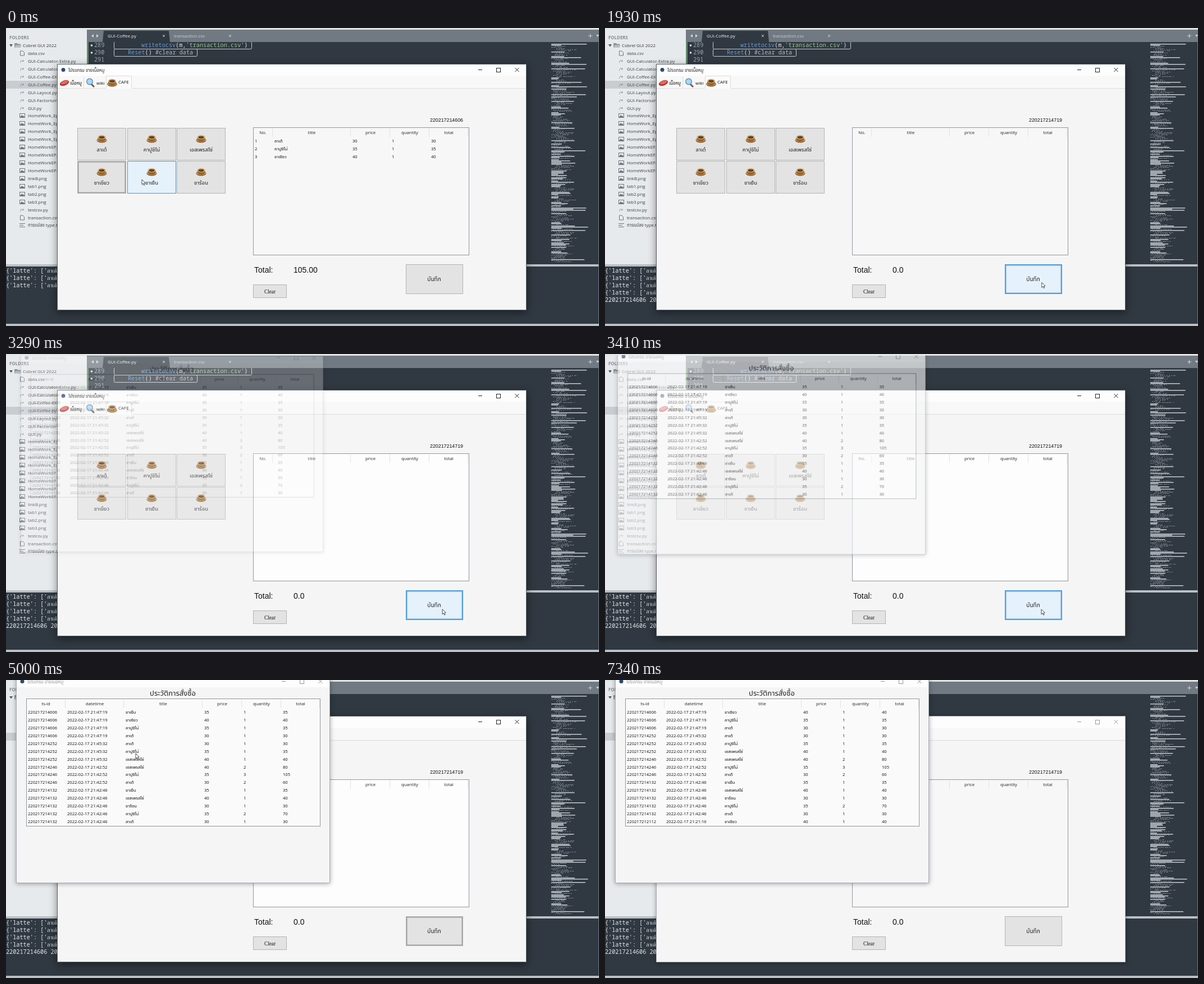
Recreate the animation shown at these times as an HTML page with a canvas. Size 1056 px wide and 531 px high, loop 7890 ms.

```html
<!DOCTYPE html>
<html lang="th">
<head>
<meta charset="utf-8">
<title>Cafe till</title>
<style>
html, body { margin: 0; width: 100%; height: 100%; overflow: hidden; background: #303841; }
canvas { display: block; width: 1056px; height: 531px; }
</style>
</head>
<body>
<canvas id="stage" width="1056" height="531"></canvas>
<script>
const LOOP = 7890;
const stage = document.getElementById('stage').getContext('2d');
const layer = new OffscreenCanvas(600, 400).getContext('2d');
let ctx = stage;
const UI = '"Open Sans", "Noto Sans", "Noto Sans Thai", sans-serif';
const THAI = '"Noto Sans Thai Looped", Loma, "Noto Sans Thai", "Noto Sans", sans-serif';
const MONO = '"Noto Sans Mono", "DejaVu Sans Mono", monospace';
const ARIAL = '"Liberation Sans", sans-serif';
const SERIF = '"Liberation Serif", serif';

const MENU = [['ลาเต้', 30], ['คาปูชิโน่', 35], ['เอสเพรสโซ่', 40],
              ['ชาเขียว', 40], ['ชาเย็น', 35], ['ชาร้อน', 30]];

// id, time, then menu index and quantity of each item
const SALES = [
  ['220217214606', '21:47:19', '41 31 11 01'],
  ['220217214252', '21:45:32', '01 11 21'],
  ['220217214246', '21:42:52', '22 13 02'],
  ['220217214132', '21:42:46', '41 21 51 12 01'],
  ['220217212112', '21:21:16', '31 41 11']
];
const HISTORY = SALES.flatMap(([id, time, items]) => items.split(' ').map(([m, q]) => {
  const [name, price] = MENU[m];
  return [id, '2022-02-17 ' + time, name, price, q, price * q];
}));

// column widths
const ORDER = { 'No.': 35, title: 139, price: 70, quantity: 70, total: 69 };
const LOG = { 'ts-id': 70, datetime: 104, title: 140, price: 70, quantity: 70, total: 69 };

const FILES = ['data.csv', 'GUI-Calculator-Extra.py', 'GUI-Calculator.py', 'GUI-Coffee-EX.py',
  'GUI-Coffee.py', 'GUI-Layout.py', 'GUI-Factorium.py', 'GUI.py',
  ...Array(4).fill('HomeWork_Ep.png'), ...Array(4).fill('HomeWorkEP.png'),
  'linkB.png', 'tab1.png', 'tab2.png', 'tab3.png', 'testcsv.py', 'transaction.csv', 'การแปลง type.txt'];

// pointer stops: time, x, y
const STOPS = [[0, 242, 270], [510, 257, 271], [910, 268, 275], [1180, 702, 461], [1480, 778, 453],
  [3530, 777, 455], [4040, 333, -5], [4330, 341, 35], [5000, 231, 131], [5820, 228, 135],
  [6250, 978, 437], [6560, 1012, 517], [6710, 1012, 560]];

const clamp = (v, lo, hi) => Math.min(hi, Math.max(lo, v));

function rect(x, y, w, h, fill) {
  ctx.fillStyle = fill;
  ctx.fillRect(x, y, w, h);
}
function frame(x, y, w, h, color, width = 1) {
  ctx.strokeStyle = color;
  ctx.lineWidth = width;
  ctx.strokeRect(x + width / 2, y + width / 2, w - width, h - width);
}
function text(s, x, y, size = 7.9, color = '#111', font = UI, align = 'left', weight = '') {
  ctx.font = `${weight} ${size}px ${font}`;
  ctx.fillStyle = color;
  ctx.textAlign = align;
  ctx.fillText(s, x, y);
}
function trace(p) {
  ctx.beginPath();
  for (let i = 0; i < p.length; i += 2) ctx.lineTo(p[i], p[i + 1]);
}
function line(color, width, ...p) {
  ctx.strokeStyle = color;
  ctx.lineWidth = width;
  trace(p);
  ctx.stroke();
}
function poly(fill, ...p) {
  ctx.fillStyle = fill;
  trace(p);
  ctx.fill();
}
function oval(x, y, rx, ry, fill, turn = 0) {
  ctx.fillStyle = fill;
  ctx.beginPath();
  ctx.ellipse(x, y, rx, ry, turn, 0, 7);
  ctx.fill();
}
function cross(x, y, r, color) {
  line(color, 1, x - r, y - r, x + r, y + r);
  line(color, 1, x - r, y + r, x + r, y - r);
}

function fileIcon(name, y) {
  const gray = '#6d757c';
  if (name.endsWith('.py')) text('/*', 25, y + 3, 8, gray);
  else if (name.endsWith('.csv')) {
    line(gray, 1, 25.5, y - 4, 30, y - 4, 32.5, y - 1.5, 32.5, y + 4, 25.5, y + 4, 25.5, y - 4);
  } else if (name.endsWith('.png')) {
    frame(24, y - 4, 10, 8, gray);
    poly(gray, 25, y + 3, 28, y - 1, 30, y + 1, 31, y, 33, y + 3);
  } else for (let i = -3; i < 5; i += 3) rect(24, y + i, i ? 10 : 7, 1, gray);
}

function sidebar() {
  rect(0, 2, 144, 419, '#e7eaec');
  text('FOLDERS', 6, 20, 7.9, '#858c92', UI, 'left', 'bold');
  poly('#555', 6, 29, 12, 29, 9, 33.5);
  poly('#8d959c', 15, 27, 20, 27, 21, 28.5, 26, 28.5, 26, 35, 15, 35);
  poly('#b9c0c5', 17, 30.5, 27.5, 30.5, 26, 35, 15, 35);
  text('Cobrel GUI 2022', 30, 34, 7.9, '#333');
  FILES.forEach((name, i) => {
    const y = Math.round(45 + 13.93 * i);
    if (name === 'GUI-Coffee.py') rect(0, y - 7, 144, 14, '#c8cdd2');
    fileIcon(name, y);
    text(name, 39, y + 3, 7.9, '#3c4247');
  });
}

function codeLine(x, y, width, parts) {
  ctx.strokeStyle = '#c4cbd1';
  ctx.lineWidth = 1;
  ctx.beginPath();
  ctx.roundRect(192.5, y - 9.5, width, 13, 2);
  ctx.stroke();
  oval(152.5, y - 3, 1.8, 1.8, '#e6eaed');
  for (const [s, color] of parts) {
    text(s, x, y, 10.2, color, MONO);
    x += ctx.measureText(s).width;
  }
}

function minimap() {
  let seed = 7;
  const rnd = () => (seed = seed * 16807 % 2147483647) / 2147483647;
  for (let y = 28; y < 418; y += 2) {
    const bold = rnd() < .45, start = bold ? 971 : 971 + 3 * Math.floor(rnd() * 4);
    const end = start + 12 + (bold ? 58 : 24) * rnd() ** 1.5;
    if (bold) rect(start, y, end - start, 1.5, '#c3cad0');
    else for (let x = start; x < end; x += 4) rect(x, y, 1 + rnd() * 3, 1, '#7d8790');
  }
}

function editor(t) {
  rect(0, 0, 1056, 531, '#303841');
  rect(144, 25, 3, 39, '#628a69');
  for (let i = 0; i < 3; i++) text(289 + i, 157, 34 + 13 * i, 10.2, '#9aa5af', MONO);
  codeLine(241, 34, 245, [['writetocsv', '#6699cc'], ['(m,', '#e0e5ea'], ["'transaction.csv'", '#99c794'], [')', '#e0e5ea']]);
  codeLine(217, 47, 148, [['Reset', '#6699cc'], ['() ', '#e0e5ea'], ['#clear data', '#b0b7c0']]);
  minimap();

  rect(0, 0, 1056, 3, '#dfe5e3');
  rect(144, 3, 912, 22, '#717a82');
  poly('#d3d8dc', 156, 11, 156, 17, 152, 14);
  poly('#d3d8dc', 161, 11, 161, 17, 165, 14);
  poly('#303841', 172, 25, 174, 5, 290, 5, 292, 25);
  text('GUI-Coffee.py', 181, 17, 7.9, '#eef1f3');
  text('transaction.csv', 299, 17, 7.9, '#cbd0d4');
  cross(281, 14, 2, '#c4cacf');
  cross(399, 14, 2, '#c4cacf');
  line('#d0d5d9', 1, 1037, 14, 1044, 14);
  line('#d0d5d9', 1, 1040.5, 10.5, 1040.5, 17.5);
  poly('#d0d5d9', 1051, 12, 1056, 12, 1053.5, 16);
  sidebar();

  rect(0, 421, 1056, 4, '#bac1c6');
  rect(0, 527, 1056, 4, '#bac1c6');
  rect(1055, 25, 1, 502, '#717a82');
  const log = Array(t < 660 ? 3 : 4).fill("{'latte': ['ลาเต้', 30, 1]");
  if (t >= 1930) log.push('220217214606 2022-02-17');
  log.forEach((s, i) => text(s, 0, 436 + 13 * i, 10.2, '#e3e8ec', MONO));
}

function cup(x, y) {
  oval(x, y + 3, 9, 4.5, '#8a5c2c');
  oval(x, y + 2, 8.5, 4, '#c49a60');
  oval(x, y, 7, 5.5, '#94642f');
  oval(x, y - 2.5, 7, 3.8, '#d8b47e');
  oval(x, y - 2.2, 5, 2.4, '#6b4018');
}

function button(x, y, w, h, { hover, focus, press } = {}) {
  rect(x, y, w, h, press ? '#cce4f7' : hover ? '#e5f1fb' : '#e3e3e3');
  if (focus) frame(x + 1, y + 1, w - 2, h - 2, hover ? '#67aae0' : '#a0a0a0', 1.5);
  frame(x, y, w, h, press ? '#2f76b0' : hover ? '#3f97da' : '#b3b3b3');
}

function windowBox(x, y, w, h, active) {
  ctx.save();
  ctx.shadowColor = `rgba(0,0,0,${active ? .45 : .35})`;
  ctx.shadowBlur = active ? 14 : 8;
  ctx.shadowOffsetY = active ? 4 : 1;
  rect(x, y, w, h, '#f5f5f5');
  ctx.restore();
  rect(x, y, w, 21, '#fdfdfd');
  frame(x, y, w, h, active ? '#566068' : '#a9afb4');
  const ink = active ? '#222' : '#999', r = x + w, m = y + 10.5;
  oval(x + 11, m, 3.5, 3.5, '#2d4a73');
  text('โปรแกรม ขายเนื้อหมู', x + 20, m + 3, 7.9, ink, THAI);
  line(ink, 1, r - 86, m, r - 79, m);
  frame(r - 54, m - 3.5, 8, 8, ink);
  cross(r - 17, m, 3.5, ink);
}

function table(x, y, w, h, cols, rows, body) {
  rect(x, y, w, h, body);
  frame(x, y, w, h, '#92969b');
  Object.entries(cols).forEach(([name, width], c) => {
    text(name, x + width / 2, y + 12, 7.8, '#222', UI, 'center');
    rect(x + width - 1, y + 2, 1, 15, '#e2e2e2');
    const font = name === 'title' ? THAI : UI;
    rows.forEach((row, i) => text(row[c], x + 3, y + 27 + 13.93 * i, 7.6, '#111', font));
    x += width;
  });
}

function tabs() {
  rect(92, 85, 834, 22, '#f8f8f8');
  rect(138, 87, 1, 20, '#dedede');
  rect(92, 107, 834, 1, '#dcdcdc');
  rect(178, 85, 46, 23, '#fbfbfb');
  line('#dcdcdc', 1, 178.5, 107, 178.5, 85.5, 223.5, 85.5, 223.5, 107);
  oval(104, 98, 8.5, 4.5, '#b8322c', -.35);
  oval(104, 97, 6.5, 3, '#e26a5e', -.35);
  text('เนื้อหมู', 114, 101, 7.9, '#111', THAI);
  line('#7a5a50', 3, 152, 100, 157, 105);
  oval(149, 95.5, 6, 6, '#5a8cba');
  oval(149, 95.5, 4.6, 4.6, '#a9d8f2');
  text('wiki', 161, 101, 8);
  cup(189, 97);
  text('CAFE', 200, 99, 8);
}

function till(t) {
  const saved = t >= 1930;
  windowBox(91, 64, 836, 439, t < 7340);
  tabs();
  const focus = t < 150 ? 3 : t < 1780 ? 4 : -1;
  MENU.forEach(([name], i) => {
    const x = Math.round(127 + 88.5 * (i % 3)), y = i < 3 ? 178 : 237;
    button(x, y, 87, 58, {
      hover: i === 4 && t < 1060, focus: i === focus, press: i === 4 && t >= 150 && t < 390
    });
    cup(x + 43.5, y + 19);
    text(name, x + 43.5, y + 42, 9.5, '#222', THAI, 'center');
  });

  const sold = saved ? [] : [0, 1, 3, 4].slice(0, t < 660 ? 3 : 4);
  const rows = sold.map((m, i) => [i + 1, ...MENU[m], 1, MENU[m][1]]);
  const sum = sold.reduce((s, m) => s + MENU[m][1], 0);
  table(440, 177, 385, 228, ORDER, rows, t >= 3290 && t < 7340 ? '#fdfdfd' : '#f7f7f7');
  text(saved ? '220217214719' : '220217214606', 755, 167, 8.85, '#111', ARIAL);
  text('Total:', 442, 436, 14, '#111', ARIAL);
  text(sum ? sum.toFixed(2) : '0.0', 512, 436, 14, '#111', ARIAL);
  button(440, 457, 60, 24);
  text('Clear', 470, 473, 9.3, '#111', SERIF, 'center');
  button(712, 421, 102, 53, {
    hover: t >= 1330 && t < 3670, focus: t >= 1780 && t < 7340, press: t >= 1780 && t < 1930
  });
  text('บันทึก', 762.5, 451, 10, '#222', THAI, 'center');
}

// opens in three steps, growing while it fades in as one layer
function history(t) {
  const p = clamp(Math.floor((t - 3290) / 120) + 1, 0, 3) / 3;
  if (!p) return;
  const first = [0, 2, 3, 2, 1][clamp(Math.floor((t - 5310) / 120), 0, 4)];
  ctx = layer;
  ctx.clearRect(0, 0, 600, 400);
  windowBox(18, -8, 559, 370, false);
  text('ประวัติการสั่งซื้อ', 297, 28, 13, '#222', THAI, 'center');
  table(36, 33, 524, 228, LOG, HISTORY.slice(first, first + 15), '#fafafa');
  ctx = stage;
  const k = .946 + .054 * p;
  ctx.globalAlpha = p ** 1.2;
  ctx.drawImage(layer.canvas, 245 * (1 - k), 112 * (1 - k), 600 * k, 400 * k);
  ctx.globalAlpha = 1;
}

// the pointer hops between stops about every 140 ms
function pointer(t) {
  const i = STOPS.findLastIndex(s => s[0] <= t);
  const [t0, x0, y0] = STOPS[i], [t1, x1, y1] = STOPS[i + 1] || [LOOP, x0, y0];
  const hops = Math.round((t1 - t0) / 140);
  const p = Math.floor((t - t0) / (t1 - t0) * hops) / hops;
  const x = x0 + (x1 - x0) * p, y = y0 + (y1 - y0) * p;
  const arrow = [x, y, x, y + 9, x + 2, y + 7, x + 3.6, y + 10.3, x + 5, y + 9.6, x + 3.6, y + 6.5, x + 6.2, y + 6.2];
  poly('#fff', ...arrow);
  line('#222', .8, ...arrow, x, y);
}

function draw(now) {
  const t = now % LOOP;
  editor(t);
  till(t);
  history(t);
  pointer(t);
  requestAnimationFrame(draw);
}
requestAnimationFrame(draw);
</script>
</body>
</html>
```
